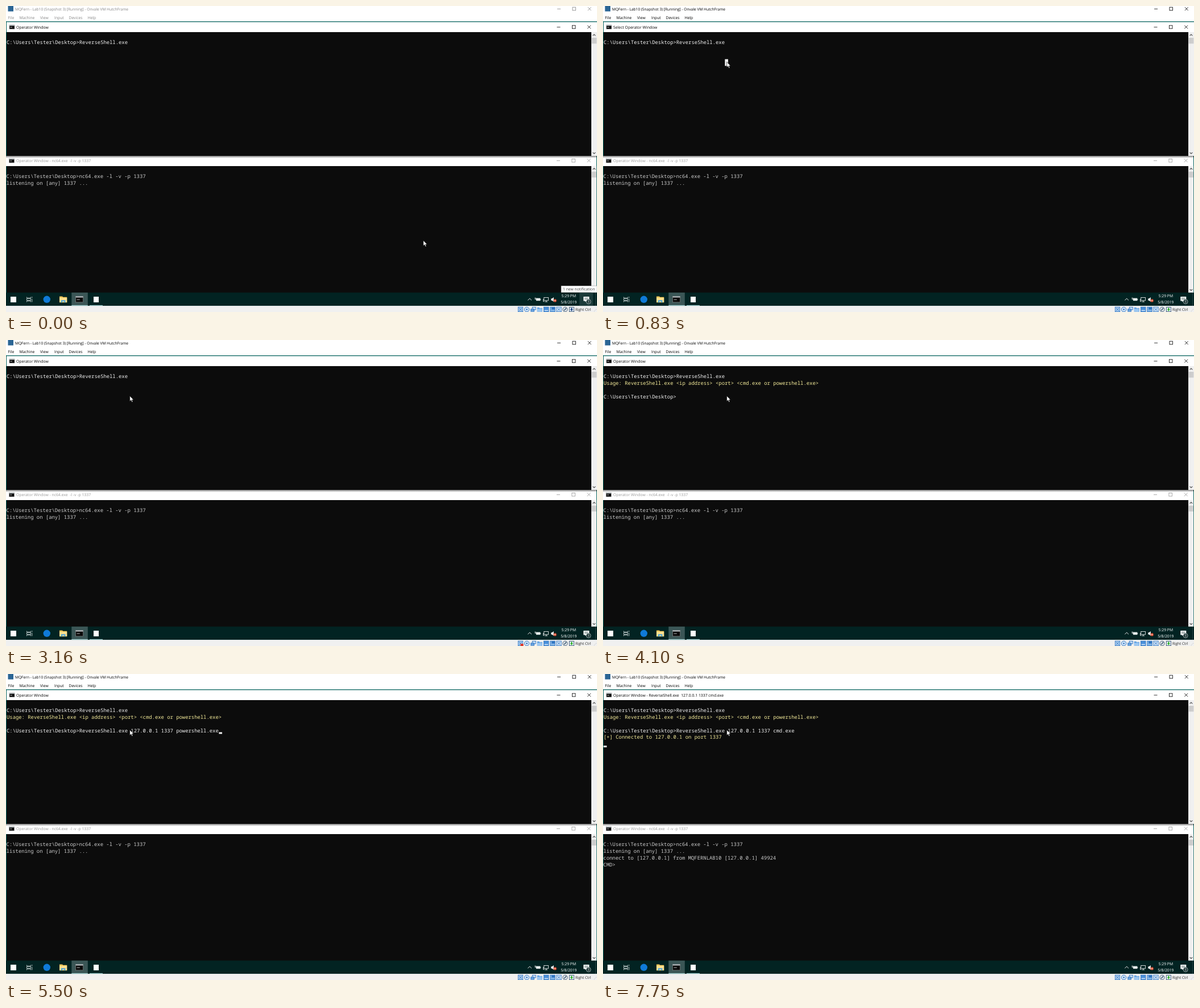
These frames come from a looping animation (1039x539 px, 8 s). An HTML page:

```html
<!DOCTYPE html>
<html lang="en">
<head>
<meta charset="utf-8">
<title>Reverse shell demo</title>
<style>
  html, body { margin: 0; width: 100%; height: 100%; overflow: hidden; background: #fff; }
  svg { display: block; width: 100vw; height: 100vh; }
  text { white-space: pre; text-rendering: geometricPrecision; font-family: "Open Sans", "Noto Sans", sans-serif; }
  .mono { font-family: "Noto Sans Mono", "DejaVu Sans Mono", monospace; font-size: 8.888px; }
</style>
</head>
<body>
<svg id="stage" viewBox="0 0 1039 539"></svg>
<script>
const LOOP = 8000, CELL_W = 16 / 3, CELL_H = 11.84;
const stage = document.getElementById('stage');

function el(tag, attrs, parent = stage) {
  const node = document.createElementNS('http://www.w3.org/2000/svg', tag);
  for (const key in attrs) node.setAttribute(key, attrs[key]);
  return parent.appendChild(node);
}
const group = (attrs = {}, parent) => el('g', attrs, parent);
const rect = (x, y, width, height, fill, parent, more) =>
  el('rect', { x, y, width, height, fill, ...more }, parent);
const disc = (cx, cy, r, fill, parent, more) => el('circle', { cx, cy, r, fill, ...more }, parent);
const line = (d, stroke, parent, width = 0.8) =>
  el('path', { d, stroke, fill: 'none', 'stroke-width': width }, parent);
const shape = (d, fill, parent) => el('path', { d, fill }, parent);
function label(x, y, str, size, fill, parent, more) {
  const node = el('text', { x, y, 'font-size': size, fill, ...more }, parent);
  node.textContent = str;
  return node;
}
const show = (node, on) => node.setAttribute('visibility', on ? 'visible' : 'hidden');

// Console cells
const colX = (col, x0 = 1) => x0 + col * CELL_W;
const rowY = (row, top) => top + row * CELL_H;
function row(n, top, str, fill, x = 1) {
  const node = el('text', { x, y: rowY(n + 1, top) - 2.9, fill, class: 'mono' });
  node.textContent = str;
  return node;
}

function windowButtons(y, color, parent, dx = 0) {
  line(`M${968.5 + dx} ${y + .2}h6`, color, parent);
  rect(995.4 + dx, y - 2.8, 5.6, 5.6, 'none', parent, { stroke: color, 'stroke-width': .8 });
  line(`M${1022.3 + dx} ${y - 2.9}l5.8 5.8m0 -5.8l-5.8 5.8`, color, parent);
}

function consoleIcon(x, y, w, h) {
  rect(x, y, w, h, '#0a0a0a', stage, { stroke: '#8a8a8a', 'stroke-width': .6 });
  rect(x, y, w, h * .2, '#b9c0c4');
  line(`M${x + w * .15} ${y + h * .55}h${w * .4}`, '#e6e6e6');
}

function scrollbar(top, bottom) {
  rect(1029, top, 10, bottom - top, '#f0f0f0');
  rect(1029.6, top + 10, 8.8, 10.3, '#cdcdcd');
  line(`M1031.6 ${top + 6.4}l2.4 -2.4l2.4 2.4`, '#505050', stage, 1.1);
  line(`M1031.6 ${bottom - 6.2}l2.4 2.4l2.4 -2.4`, '#505050', stage, 1.1);
}

// Host window frame
rect(0, 0, 1039, 539, '#fff');
const frame = group();
rect(3.5, 0, 9.5, 9.5, '#2b6594', frame);
label(16, 7.9, 'MQFern - Lab10 (Snapshot 3) [Running] - Onvale VM HutchFrame', 6.6, 'currentColor', frame);
[['File', 3.5], ['Machine', 23.5], ['View', 60], ['Input', 85], ['Devices', 110.5], ['Help', 143.5]]
  .forEach(([name, x]) => label(x, 23, name, 6.75, 'currentColor', frame));
windowButtons(5, 'currentColor', frame, .6);

// Guest desktop edge
rect(0, 27, 1039, 478, '#0b6560');

// Upper console
const TOP1 = 46.3, TOP2 = 282.2;
rect(1, 28.3, 1038, 18, '#fff');
rect(1, 46, 1028, 218, '#0c0c0c');
scrollbar(46, 264);
consoleIcon(6, 33.6, 9, 7);
const title = label(18, 39.6, '', 6.85, '#000');
windowButtons(37, '#000');

// Lower console
rect(0, 264, 1038, 18, '#fff');
rect(1, 282, 1028, 223, '#0c0c0c');
scrollbar(281.8, 505);
rect(1038.2, 264, .8, 241, '#0b6560');
const shade = el('linearGradient', { id: 'shade', x2: 0, y2: 1 }, el('defs', {}));
el('stop', { offset: 0, 'stop-color': '#000', 'stop-opacity': .5 }, shade);
el('stop', { offset: 1, 'stop-color': '#000', 'stop-opacity': 0 }, shade);
rect(0, 264, 1039, 4, 'url(#shade)');
consoleIcon(5.5, 269, 9, 7);
label(18, 275.2, 'Operator Window - nc64.exe  -l -v -p 1337', 6.85, '#999');
windowButtons(272.3, '#999', stage, -.5);

// Console text
const PATH = 'C:\\Users\\Tester\\Desktop>', EXE = 'ReverseShell.exe';
const WHITE = '#f2f2f2', YELLOW = '#f5ec9b', GREY = '#ccc';
row(1, TOP1, PATH + EXE, WHITE);
const usage = row(2, TOP1, `Usage: ${EXE} <ip address> <port> <cmd.exe or powershell.exe>`, YELLOW);
const prompt = row(4, TOP1, '', WHITE);
const connected = row(5, TOP1, '[+] Connected to 127.0.0.1 on port 1337', YELLOW);
row(1, TOP2, PATH + 'nc64.exe -l -v -p 1337', GREY, .6);
row(2, TOP2, 'listening on [any] 1337 ...', GREY, .6);
const incoming = row(3, TOP2, 'connect to [127.0.0.1] from MQFERNLAB10 [127.0.0.1] 49924', GREY, .6);
const remote = row(4, TOP2, 'CMD>', GREY, .6);
const caret = rect(0, 0, 5.6, 3, '#f2f2f2');
const block = rect(colX(40), rowY(4, TOP1), 5.6, CELL_H, '#f2f2f2');

// Taskbar
rect(0, 504.8, 1039, 23.5, '#022322');
rect(8, 512, 10, 10, '#fff');
line('M36.5 512.5v1.8h7v-1.8M36.5 521.5v-1.8h7v1.8M36.5 515.4h7v3h-7zM45.8 512v2.2m0 1.6v5.7', '#dfe6e6');
disc(71.8, 516.8, 6.2, '#0f7ad8');
shape('M94 511.5h5l1.2 1.2h7v9.5h-13.2z', '#f6c95a');
rect(94, 514, 13.2, 8, '#fbe08f');
shape('M97 522.2v-4h7.4v4h-2v-2h-3.4v2z', '#4aa3dc');
rect(115.3, 504.8, 28.5, 23.5, '#3b5656');
rect(115.3, 526.9, 28.5, 1.4, '#8fc3c3');
consoleIcon(122.6, 511.4, 13, 10.4);
rect(147, 526.9, 23, 1.4, '#8fc3c3');
rect(154, 512, 9, 10, '#fff');

// Tray
line('M917.4 518.4l3.3 -3.3l3.3 3.3', '#fff', stage, .9);
rect(932, 514.6, 7.4, 4.6, '#e8eeee');
line('M930.2 513.4v3.4h2M930.2 515h2.4M939.8 516v2', '#fff');
rect(945.8, 513.4, 7.8, 5.4, 'none', stage, { stroke: '#fff', 'stroke-width': .8 });
line('M947.6 521h4.4M949.8 519v2M944.6 516v4.6h2', '#fff');
shape('M958.4 515.3h1.8l2.6 -2.3v8l-2.6 -2.3h-1.8z', '#fff');
disc(965.2, 518.9, 2.6, '#d9482b');
line('M964.2 517.9l2 2m0 -2l-2 2', '#fff', stage, .7);
const mid = { 'text-anchor': 'middle' };
label(989.3, 513.3, '5:29 PM', 6.8, '#fff', stage, mid);
label(989.3, 523.8, '5/8/2019', 6.8, '#fff', stage, mid);
const hover = rect(1008, 504.8, 24, 23.5, '#1b3a39');
shape('M1015.3 512h10v7.4h-5l-2 2v-2h-3z', '#fff');
line('M1017 514.3h6.6M1017 516.4h6.6', '#1d3d3c', stage, .7);
disc(1024.2, 520.8, 4, '#263e3e', stage, { stroke: '#b9c6c6', 'stroke-width': .7 });
label(1024.2, 523, '1', 6, '#fff', stage, mid);
rect(1036.4, 504.8, .6, 23.5, '#3a5453');
const tip = group();
rect(976, 493, 63, 11.6, '#fff', tip, { stroke: '#8c8c8c', 'stroke-width': .5 });
label(979, 501.2, '1 new notification', 6.8, '#444', tip);

// Status bar
rect(0, 528.3, 1039, 10.7, '#f0f0f0');
const BLUE = '#2d73c0', PALE = '#cfe3f7';
const tile = (x, fill) => rect(x, 530.2, 8.4, 8.4, fill, stage, { stroke: BLUE, 'stroke-width': .8 });
tile(900.3, '#a9cbee');
line('M902 532l5 5M907 532l-5 5', BLUE, stage, .9);
const disk = rect(904.6, 535, 5, 4, '#e0392b');
disc(915.6, 534.5, 4.2, PALE, stage, { stroke: BLUE, 'stroke-width': .9 });
disc(915.6, 534.5, 1.3, BLUE);
rect(925.3, 530.4, 6, 4.6, PALE, stage, { stroke: BLUE, 'stroke-width': .9 });
rect(922.8, 533.8, 5.6, 4.2, '#6aa5e0', stage, { stroke: BLUE, 'stroke-width': .9 });
shape('M933.8 531h3.4l1 1.2h4.8v6.3h-9.2z', '#5d9fe2');
rect(934.2, 533.4, 8.4, 4.6, '#9cc8f2');
tile(945.6, '#4a90da');
rect(946.6, 535.6, 6.4, 1.6, PALE);
tile(956.8, '#7fb2e5');
rect(959.4, 531, 5.4, 3.6, BLUE);
tile(967.8, PALE);
line('M969.4 532l5 5M974.4 532l-5 5', BLUE, stage, .9);
disc(983, 534.5, 4.2, '#d7dde2', stage, { stroke: '#4a6078', 'stroke-width': .9 });
line('M981 536.6l4.2 -4.6', '#2b4a68', stage, 1.2);
rect(990.4, 530.6, 8, 7.8, '#e9f1fa', stage, { stroke: '#35526f', 'stroke-width': .9 });
const capture = shape('M993.2 531.8h2.4v2.6h1.6l-2.8 3l-2.8 -3h1.6z', '#234a86');
label(1001, 537, 'Right Ctrl', 6.4, '#222');
for (let i = 0; i < 3; i++) rect(1037 - i * 1.6, 533.8 + i * 1.6, .8, .8, '#a5a5a5');

const pointer = el('path', {
  d: 'M0 0V9.4L2.2 7.4L3.7 10.9L5.3 10.2L3.8 6.9H6.7Z', fill: '#fff', stroke: '#000', 'stroke-width': .6
});

// Timeline
const CARET = [310, 830, 1360, 1910, 2460, 2930, 3330, 3940, 4490, 5650, 6110, 7200, 7440];
const DISK = [2610, 2780, 3160, 3330, 3710, 3860, 4020, 4100, 5190, 5270, 6360, 6430, 7440, 7750];
const ARGS = ' 127.0.0.1 1337 ';
const TYPED = [
  [0, ''], [4640, EXE], [5040, ''],
  [5500, EXE + ARGS + 'powershell.exe'], [6660, EXE + ARGS + 'cmd.exe']
];
const toggled = (times, t) => times.filter(x => x <= t).length % 2 === 1;
const latest = (steps, t) => steps.filter(s => s[0] <= t).pop()[1];
const ease = p => p * p * (3 - 2 * p);

function render(t) {
  const printed = t >= 3330, running = t >= 7440, selecting = t >= 620 && t < 2780;
  const active = t >= 540;
  const input = latest(TYPED, t);

  frame.setAttribute('color', active ? '#000' : '#858585');
  const name = 'Operator Window';
  title.textContent = selecting ? 'Select ' + name
    : running ? `${name} - ${EXE}  127.0.0.1 1337 cmd.exe` : name;
  show(tip, t < 150);
  show(hover, t < 150);
  show(block, selecting);
  show(disk, toggled(DISK, t));
  capture.setAttribute('fill', t >= 760 ? '#35b02f' : '#234a86');

  show(usage, printed);
  prompt.textContent = printed ? PATH + input : '';
  show(connected, running);
  show(incoming, t >= 7520);
  show(remote, t >= 7680);

  const [r, c] = running ? [6, 0] : printed ? [4, PATH.length + input.length] : [1, 40];
  caret.setAttribute('x', colX(c));
  caret.setAttribute('y', rowY(r + 1, TOP1) - 3);
  show(caret, toggled(CARET, t));

  const p = ease(Math.min(1, Math.max(0, (t - 40) / 560)));
  pointer.setAttribute('transform', `translate(${733.7 - 516 * p} ${413 - 314.5 * p})`);
}

const start = performance.now();
function tick() {
  render((performance.now() - start) % LOOP);
  requestAnimationFrame(tick);
}
tick();
</script>
</body>
</html>
```
